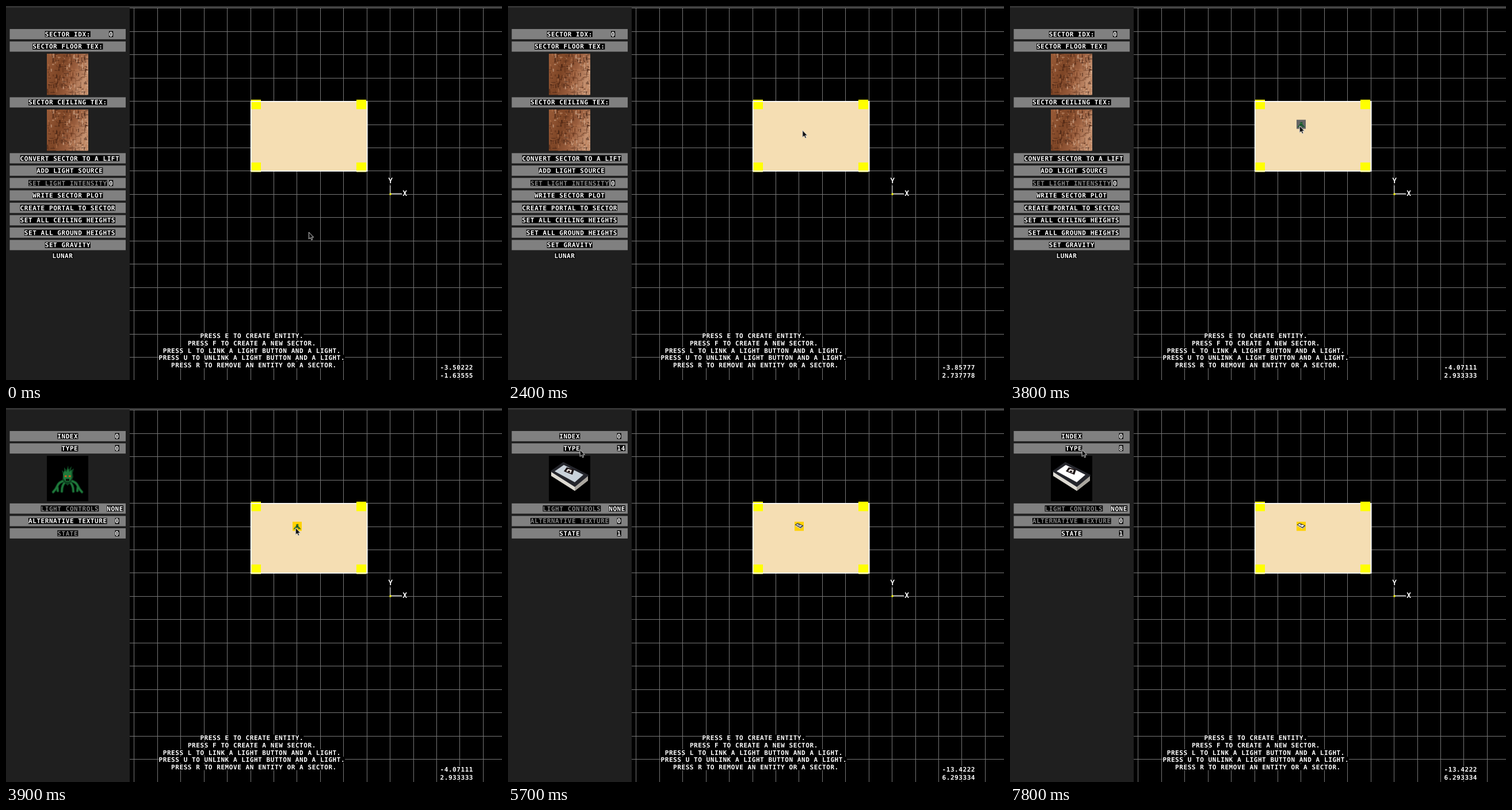
An HTML page for the animation above (8000 ms loop, 862 by 650 pixels).

```html
<!DOCTYPE html>
<html lang="en">
<head>
<meta charset="utf-8">
<title>Sector editor</title>
<style>
  html, body { margin: 0; width: 100%; height: 100%; overflow: hidden; background: #000; }
  svg { display: block; }
  #stage { width: 100vw; height: 100vh; }
  text {
    font: bold 11px "DejaVu Sans Mono", "Liberation Mono", monospace;
    letter-spacing: 0.57px;
    text-rendering: geometricPrecision;
    fill: #fff;
  }
  #axes text { font-size: 13px; }
  .dim { fill: #858585; }
</style>
</head>
<body>
<svg id="stage" viewBox="0 0 862 650" xmlns="http://www.w3.org/2000/svg">
  <defs>
    <linearGradient id="rust" x1="0" y1="0" x2="1" y2="0.35">
      <stop offset="0" stop-color="#9a5c38"/>
      <stop offset="0.4" stop-color="#7d4526"/>
      <stop offset="0.7" stop-color="#985c3c"/>
      <stop offset="1" stop-color="#c4906f"/>
    </linearGradient>
  </defs>
  <rect width="862" height="650"/>
  <g id="grid" fill="#767676" shape-rendering="crispEdges"></g>
  <rect width="862" height="3" fill="#333"/>
  <rect y="3" width="215" height="647" fill="#1f1f1f"/>
  <g id="sector"></g>
  <g id="axes"></g>
  <g id="help"></g>
  <g id="sectorPanel"></g>
  <g id="entityPanel"></g>
  <g id="entity"></g>
  <g id="coords"></g>
  <path id="cursor" d="M0 0V12L2.8 9.6L4.6 13.7L6.6 12.8L4.8 8.9H8.4Z"
    fill="#111" stroke="#ddd" stroke-width="0.9"/>
</svg>
<script>
const LOOP = 8000, STEP = 100, CHAR = 7.19;
const SCALE = 0.719, UNIT = 56.25, ORIGIN = [667.9, 326.9];
const $ = id => document.getElementById(id);

const rect = (x, y, w, h, fill, extra = '') =>
  `<rect x="${x}" y="${y}" width="${w}" height="${h}"${fill ? ` fill="${fill}"` : ''} ${extra}/>`;
const path = (d, fill, extra = '') => `<path d="${d}" fill="${fill}" ${extra}/>`;

// Text on a black strip; y is the middle of the line.
const label = (x, y, str, dim) =>
  rect(x, y - 5.2, (str.length * CHAR).toFixed(1), 10.4, '#000') +
  `<text x="${x}" y="${y + 4}"${dim ? ' class="dim"' : ''}>${str}</text>`;

// Panel text sits on character columns.
const column = n => 24.6 + n * CHAR;
const bar = y => rect(6.5, y - 8.8, 201.5, 17.8, '#808080');
const row = (y, col, str, dim) => bar(y) + label(column(col), y, str, dim);

function random(seed) {
  return () => (seed = (seed * 16807) % 2147483647) / 2147483647;
}

function rustTile(y) {
  const rnd = random(71), tones = ['#3a1c10', '#5a2c16', '#b87850', '#e2bda2'];
  let marks = '';
  for (let i = 0; i < 320; i++) {
    const light = rnd() < 0.48, x = light ? 72 * Math.sqrt(rnd()) : 72 * rnd();
    const tone = tones[(light ? 2 : 0) + (rnd() < 0.6 ? 0 : 1)];
    const flat = rnd() < 0.4;
    marks += rect((x - 2).toFixed(1), (rnd() * 74 - 2).toFixed(1),
      (flat ? 2 + rnd() * 7 : 0.7 + rnd() * 1.8).toFixed(1),
      (flat ? 0.7 + rnd() * 1.2 : 1.5 + rnd() * 7).toFixed(1), tone, 'opacity="0.5"');
  }
  return `<svg x="71" y="${y}" width="72" height="72">` +
    rect(0, 0, 72, 72, 'url(#rust)') + marks + '</svg>';
}

// Sprites are drawn in a 72 by 79 box.
function creature(color, dark) {
  const arms = 'M32 43Q21 45 18 53Q16 58 11 63M40 43Q51 45 54 53Q56 58 61 63' +
    'M18 53L19 61M54 53L53 61M33 45Q26 50 26 62M39 45Q46 50 46 62';
  return path(arms, 'none', `stroke="${dark}" stroke-width="5" stroke-linecap="round"`) +
    path(arms, 'none', `stroke="${color}" stroke-width="2.6" stroke-linecap="round"`) +
    path('M27 42L28 33L26 25L30 28L30 20L34 25L37 17L38 24L43 18L42 25L47 22L45 30L46 37L42 46L36 52L30 46Z', dark) +
    path('M29 40L28 32L31 26L34 28L37 22L39 28L43 25L43 39L39 45H33Z', color) +
    path('M31 34h3.5v3H31ZM38 34h3.5v3H38Z', '#c6601f') +
    path('M33 40h6v4h-6Z', '#0a1c0e');
}

function key(color) {
  return rect(24, 4, 24, 37, color, 'rx="5"') +
    rect(28.5, 9, 15, 25, '#34363f', 'rx="2"') +
    rect(32, 12, 6, 7, '#555b68') + path('M32 25h7v4h-7Z', '#17181d') +
    path('M24.5 40H47.5L46 49V69L42 71H33L25 64V58L27 56Z', '#7186b8') +
    path('M29 43h10v2.2H29ZM29 49h10v2.2H29ZM29 55h10v2.2H29Z', '#161a26') +
    path('M43 42H46V69L43 70Z', '#5d709f');
}

function pack(color) {
  return path('M4 27V35L45 61L68 43V34L45 53Z', '#dedbd3') +
    path('M45 53V61L68 43V34Z', '#aaa69f') +
    path('M4 27L25 12L68 34L45 53Z', '#24252b', 'stroke="#24252b" stroke-width="2" stroke-linejoin="round"') +
    path('M10 27L26 16L60 33L45 46Z', color) +
    path('M26 27L31 20L44 24L41 33Z', '#1c1416') +
    path('M30 27L33 23L40 25L38 30Z', '#f4efec') +
    path('M33 26h4v2.5h-4Z', '#1c1416');
}

const sprites = {
  0: creature('#1f7a3b', '#0d4320'),
  15: creature('#7d4a30', '#43261a'),
  14: pack('#c9d2da'),
  13: key('#1fb53a'),
  12: key('#2454e0'),
  11: key('#f0141c'),
  10: creature('#8a2a2a', '#481414'),
  9: creature('#6d7278', '#33373c'),
  8: pack('#fff')
};

// Time and entity type chosen from then on.
const types = [[0, 0], [5400, 15], [5700, 14], [6000, 13], [6400, 12],
  [6800, 11], [7100, 10], [7400, 9], [7800, 8]];

// Time and pointer place, in editor pixels from the axis origin.
const moves = [[0, -197, -92], [400, -197, -92], [800, -232, 70], [1000, -224, 141],
  [1300, -224, 141], [1600, -217, 154], [2600, -217, 154], [2700, -222, 159],
  [3200, -222, 159], [3700, -229, 165], [3900, -229, 165], [4400, -460, 262],
  [4800, -742, 395], [5000, -770, 378], [5100, -755, 354], [LOOP, -755, 354]];

function pointerAt(t) {
  const i = moves.findIndex(m => m[0] > t);
  const a = moves[i - 1], b = moves[i], k = (t - a[0]) / (b[0] - a[0]);
  return [1, 2].map(n => Math.round(a[n] + (b[n] - a[n]) * k));
}

// The small excess reproduces single-precision rounding.
const coord = v => (v / UNIT * (1 + 5e-8)).toFixed(6).slice(0, 8);

function entityPanel(type) {
  const item = type >= 11 && type <= 14 || type === 8;
  return row(48.8, 9, 'INDEX') + label(189.6, 48.8, '0') +
    row(70.2, 10, 'TYPE') + label(189.6, 69.6, String(type)) +
    rect(71, 83, 72, 79, '#000') +
    `<g transform="translate(71 83)">${sprites[type]}</g>` +
    row(174.6, 5, 'LIGHT CONTROLS', true) + label(175.2, 174.6, 'NONE') +
    row(196.4, 2, 'ALTERNATIVE TEXTURE', item) + label(189.6, 196.4, '0') +
    row(217.8, 9, 'STATE', !item) + label(189.6, 217.8, item ? '1' : '0');
}

function buildScene() {
  let grid = '';
  for (let k = 0; k < 16; k++) {
    grid += rect(Math.floor(222.9 + 40.433 * k), 3, 1, 647);
    grid += rect(215, Math.floor(3.96 + 40.433 * k), 647, 1);
  }
  $('grid').innerHTML = grid;

  const corner = (x, y) => rect(x, y, 17, 16.5, '#ff0');
  $('sector').innerHTML = rect(425.7, 165.7, 202, 121.2, '#f5deb3') +
    corner(426, 162.8) + corner(426, 272) + corner(609, 272) +
    rect(425.7, 165.9, 202, 121, 'none', 'stroke="#fff" stroke-width="1.7"') +
    corner(609, 162.8);

  $('axes').innerHTML = rect(667, 312, 1.3, 15, '#ddd') + rect(668, 325.6, 20, 1.3, '#ddd') +
    rect(666.5, 325.5, 3, 3, '#ff0') + label(664.2, 304, 'Y') + label(689.2, 326, 'X');

  $('help').innerHTML = [
    [337.4, 'PRESS E TO CREATE ENTITY.'],
    [315.9, 'PRESS F TO CREATE A NEW SECTOR.'],
    [272.7, 'PRESS L TO LINK A LIGHT BUTTON AND A LIGHT.'],
    [265.5, 'PRESS U TO UNLINK A LIGHT BUTTON AND A LIGHT.'],
    [287.1, 'PRESS R TO REMOVE AN ENTITY OR A SECTOR.']
  ].map(([x, str], i) => label(x, 572.8 + i * 12.85, str)).join('');

  $('sectorPanel').innerHTML =
    row(48.8, 6, 'SECTOR IDX:') + label(179, 48.8, '0') +
    row(70.4, 3, 'SECTOR FLOOR TEX:') + rustTile(82.7) +
    row(167.4, 2, 'SECTOR CEILING TEX:') + rustTile(179.7) +
    [
      [0, 'CONVERT SECTOR TO A LIFT'],
      [4, 'ADD LIGHT SOURCE'],
      [2, 'SET LIGHT INTENSITY', true],
      [3, 'WRITE SECTOR PLOT'],
      [0, 'CREATE PORTAL TO SECTOR'],
      [0, 'SET ALL CEILING HEIGHTS'],
      [1, 'SET ALL GROUND HEIGHTS'],
      [6, 'SET GRAVITY']
    ].map(([col, str, dim], i) => row(264.5 + i * 21.55, col, str, dim)).join('') +
    label(179, 307.7, '0') + label(80.5, 433.8, 'LUNAR');
}

function show(id, on) {
  $(id).style.display = on ? '' : 'none';
}

let last = -1;
function draw(time) {
  const t = Math.floor(time / STEP) * STEP;
  if (t === last) return;
  last = t;

  const [mx, my] = pointerAt(t);
  const type = types.filter(e => e[0] <= t).pop()[1];
  const selected = t >= 3900;

  show('sectorPanel', !selected);
  show('entityPanel', selected);
  show('entity', t >= 2700);
  $('entityPanel').innerHTML = entityPanel(type);
  $('entity').innerHTML = rect(498, 197.7, 16, 15.8, selected ? '#ffd200' : '#666') +
    `<g transform="translate(498 197.7) scale(0.222 0.2)">${sprites[type]}</g>`;
  $('coords').innerHTML = label(754.5, 627.6, coord(mx)) + label(754.5, 641.9, coord(my));
  const x = ORIGIN[0] + mx * SCALE, y = ORIGIN[1] - my * SCALE;
  $('cursor').setAttribute('transform', `translate(${x.toFixed(2)} ${y.toFixed(2)})`);
}

buildScene();
const start = performance.now();
function tick() {
  draw((performance.now() - start) % LOOP);
  requestAnimationFrame(tick);
}
tick();
</script>
</body>
</html>
```
